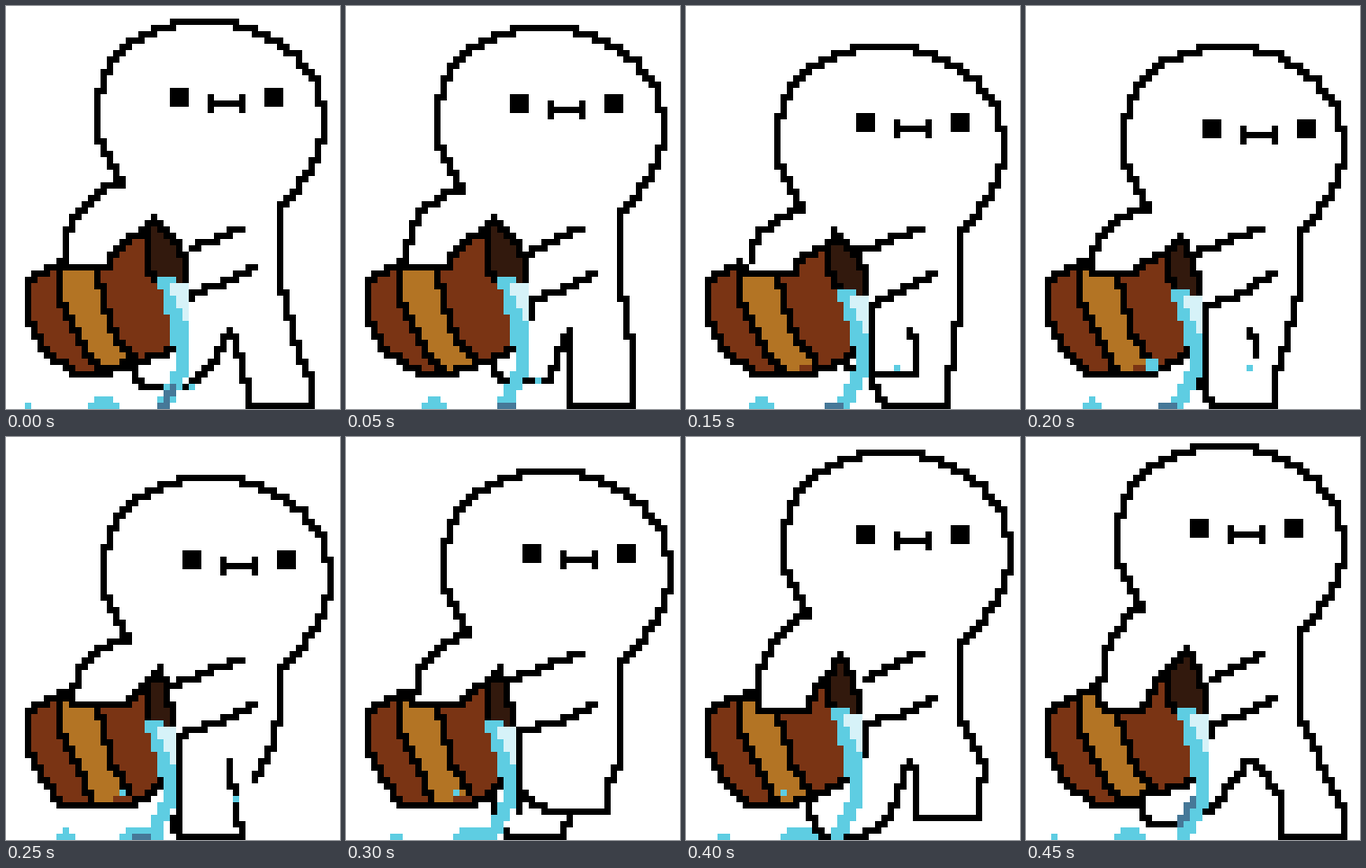
Recreate the animation shown at these times as an HTML page with a canvas. Size 371 px wide and 448 px high, loop 500 ms.

```html
<!DOCTYPE html>
<html lang="en">
<head>
<meta charset="utf-8">
<title>Pouring the barrel</title>
<style>
html, body { margin: 0; width: 100%; height: 100%; overflow: hidden; background: #fff; }
canvas { display: block; width: 371px; height: 448px; }
</style>
</head>
<body>
<canvas id="stage" width="371" height="448"></canvas>
<script>
const CELL = 7, COLS = 53, ROWS = 64, STEP = 50, STEPS = 10;
const INK = '#000', PAPER = '#fff', BROWN = '#7a3414', GOLD = '#b37424', HOLLOW = '#32190d';
const WATER = '#5ecde2', FOAM = '#d6f2f8', DEEP = '#467898';
const ctx = document.getElementById('stage').getContext('2d');
const { PI, sin, cos, abs, min, max, round } = Math;

const mix = (a, b, f) => a + (b - a) * f;
const ribbon = (left, right) => [...left, ...[...right].reverse()];

function box(x, y, w, h, color = INK) {
  ctx.fillStyle = color;
  ctx.fillRect(round(x) * CELL, round(y) * CELL, round(w) * CELL, round(h) * CELL);
}

// Diagonal steps get a corner cell on the side of the hub.
function line(points, color = INK, hub = [32, 32]) {
  const far = (x, y) => (x - hub[0]) ** 2 + (y - hub[1]) ** 2;
  let last = null;
  points.forEach((point, i) => {
    const [x2, y2] = point.map(round), [x1, y1] = points[max(i - 1, 0)].map(round);
    const n = max(abs(x2 - x1), abs(y2 - y1), 1);
    for (let k = 0; k <= n; k++) {
      const x = round(mix(x1, x2, k / n)), y = round(mix(y1, y2, k / n));
      if (last && last[0] !== x && last[1] !== y) {
        if (far(x, last[1]) < far(last[0], y)) box(x, last[1], 1, 1, color);
        else box(last[0], y, 1, 1, color);
      }
      box(x, y, 1, 1, color);
      last = [x, y];
    }
  });
}

function area(shape, color) {
  const points = shape.map(p => p.map(round));
  for (let y = 0; y < ROWS; y++) {
    const hits = [];
    points.forEach(([x1, y1], i) => {
      const [x2, y2] = points[(i + 1) % points.length];
      if ((y1 <= y) !== (y2 <= y)) hits.push(mix(x1, x2, (y - y1) / (y2 - y1)));
    });
    hits.sort((a, b) => a - b);
    for (let i = 0; i + 1 < hits.length; i += 2) {
      const from = Math.ceil(hits[i]), to = Math.floor(hits[i + 1]);
      if (to >= from) box(from, y, to - from + 1, 1, color);
    }
  }
}

function curve(from, bend, to) {
  return Array.from({ length: 13 }, (_, i) => {
    const f = i / 12;
    return from.map((v, k) => mix(mix(v, bend[k], f), mix(bend[k], to[k], f), f));
  });
}

function drawLegs(t, swing, side) {
  const crotch = [35, 51], hip = [43, 44];
  const v = (t + 1) % STEPS / STEPS;
  const standing = { x: 50 - 25 * v + 3 * v * sin(PI * v), y: 63 };
  const lifted = {
    x: 25 + 25 * v + 2 * sin(2 * PI * v),
    y: 63 - 5 * sin(PI * (0.1 + 0.8 * v)),
    bend: 1.5
  };
  const apart = abs(standing.x - lifted.x) > 4;

  for (const foot of [standing, lifted]) {
    const other = foot === standing ? lifted : standing;
    const front = foot.x > other.x;
    const heel = foot.x - 6 - 4 * min(1, (foot.x - 25) / 12);
    const shin = front
      ? [hip, [mix(hip[0], foot.x, 0.75) + (foot.bend || 0), foot.y - 7], [foot.x, foot.y - 4]]
      : [crotch, [mix(crotch[0], foot.x, 0.5), foot.y - 3]];
    const calf = front && heel > 32
      ? [[heel - 0.5, foot.y - 6], crotch]
      : [[min(side, heel - 2), foot.y - 3], [min(side, heel - 3), 52]];
    if (foot === lifted && !apart) {
      line(shin);
      continue;
    }
    const leg = [...shin, [foot.x, foot.y], [heel, foot.y], ...calf];
    area(leg, PAPER);
    line(leg);
  }
}

function drawHead(t, swing) {
  const top = round(swing(3.8, 2.6, 9)), cy = top + 15.5;
  const left = round(swing(14.5, 0.6, 6)), right = round(swing(50.45, 0.6, 6.5));
  const cx = (left + right) / 2, rx = (right - left) / 2;
  const start = 2.46, end = 2 * PI + 0.91, contour = [];
  for (let i = 0; i <= 90; i++) {
    const a = mix(start, end, i / 90), c = cos(a), s = sin(a);
    const upperLeft = c < 0 && s < 0;
    const power = upperLeft ? 2 / 2.4 : 1;
    const ry = s < 0 || c < 0 ? 15.5 : 17.8;
    contour.push([
      cx + rx * Math.sign(c) * abs(c) ** power,
      cy + ry * Math.sign(s) * abs(s) ** power
    ]);
  }
  line(contour, INK, [cx, cy]);

  const x = round(swing(27, 0.9, 5.5)), y = round(swing(15.6, 2.6, 4.4 + STEPS / 2));
  box(x, y, 3, 3);
  box(x + 15, y, 3, 3);
  box(x + 6, y + 1, 1, 3);
  box(x + 11, y + 1, 1, 3);
  box(x + 6, y + 2, 6, 1);
  return { neckL: contour[0], neckR: contour[90] };
}

function drawBarrel(drift, swing, rim) {
  const { x: rx, top, bottom } = rim;
  const sag = swing(0, 1, 4.5), lean = swing(0, 1, 1), hub = [14, 49];
  const dip = 40.8 + 2.6 * drift;
  const crest = [7.7 + 2.6 * drift, 40.3 - drift], grip = [9.7 + 2.3 * drift, dip];
  const lip = [[22, top + 1 + 2 * drift], [22, 41], [rx - 4, bottom - 1], [rx - 3, bottom]];
  const mouth = [
    [22.7 + 2 * drift, top], [rx - 1.5, top + 4], [rx, top + 7], [rx, bottom]
  ];
  const shell = [
    [3, 43], [4, 42], crest, grip, [15 + 3.3 * drift, dip], [16.8 + 3.5 * drift, top + 4.5], lip[0],
    ...mouth,
    [rx - 2, 50], [rx - 2, 54 + sag], [rx - 3, 55.5 + sag], [19, 57.2 + sag * 0.8],
    [15, 58.4], [9.3 + lean * 1.3, 58.4], [5, 54], [3, 49], [3, 43]
  ];
  const hoopL = [[7.6, 41], [8, 46.5], [9.7, 51], [12, 55], [14.2 + lean, 57.5]];
  const hoopR = [[14.4, dip], [15, 46], [16.3, 50], [17.6 + lean * 0.6, 53], [19.6 + lean, 56]];

  area(shell, BROWN);
  area([...ribbon(hoopL, hoopR), grip, crest], GOLD);
  area(ribbon(lip, mouth), HOLLOW);
  [hoopL, hoopR, lip, shell].forEach(l => line(l, INK, hub));
}

function drawPuddle(age) {
  if (age > 15) return;
  const w = max(1, 7 - 0.42 * age), x = 21 - 1.2 * age - w / 2;
  box(x, 63, w, 1, WATER);
  if (w > 2.4) box(x + 1, 62, w - 2, 1, WATER);
}

function drawWater(t, { x: rx, bottom }) {
  const left = [
    [rx - 4, bottom - 1], [rx - 3, bottom + 2], [rx - 1.6, 51], [rx - 1.5, 57], [rx - 4, 63]
  ];
  const right = [
    [rx - 3, bottom - 1], [rx - 1, bottom + 3], [rx - 0.2, 52], [rx - 0.3, 57], [rx - 2, 62]
  ];
  const flow = ribbon(left, right), foam = [[rx - 2, bottom], [rx - 0.4, bottom], [rx, bottom + 5]];
  [[flow, WATER], [foam, FOAM]].forEach(([shape, color]) => {
    area(shape, color);
    line([...shape, shape[0]], color);
  });

  const age = (t + 5) % STEPS;
  drawPuddle(age);
  drawPuddle(age + STEPS);
  if (t <= 5) box(29 + 1.4 * t, max(57, 60 - t), 1, 1, WATER);
  if (t >= 4 && t <= 8) box(23 - t, 56, t === 4 ? 2 : 1, t === 4 ? 2 : 1, WATER);

  const fall = (t + 1) % STEPS;
  if (fall < 2) line([[26, 57 + 3 * fall], [24, 61 + 3 * fall]], DEEP);
  else if (fall < 7) box(25 - t, 63, 3, 1, DEEP);
}

function draw(t) {
  const swing = (mid, size, peak) => {
    const low = peak === 9 || peak > 9 ? -1 : 1;
    return mid + low * size * cos(2 * PI * (t - peak) / STEPS);
  };
  const drift = t / STEPS;
  const rim = { x: round(swing(27.2, 1, 1)), top: swing(34.5, 1.5, 5), bottom: swing(45, 1.4, 4.5) };
  const cuff = [rim.x + 1, swing(46, 0.8, 4)];

  box(0, 0, COLS, ROWS, PAPER);
  drawLegs(t, swing, cuff[0]);
  const { neckL, neckR } = drawHead(t, swing);
  line([neckR, [43, neckR[1] + 1], [43, 44]]);
  line(curve(neckL, [9 + 3.6 * drift, neckL[1] + 2.5], [8.7 + 2.8 * drift, 39.5]));
  line([[swing(27.3, 1.4, -0.5), swing(38.6, 0.5, 3)], [37, swing(34.5, 1, 2.5)]]);
  line([cuff, [33, cuff[1] - 1.2], [39, swing(41.5, 0.6, 3.5)]]);
  line([cuff, [cuff[0], swing(54, 8, 4.7)]]);
  drawBarrel(drift, swing, rim);
  drawWater(t, rim);
}

function tick() {
  draw(Math.floor(performance.now() / STEP) % STEPS);
  requestAnimationFrame(tick);
}
tick();
</script>
</body>
</html>
```
